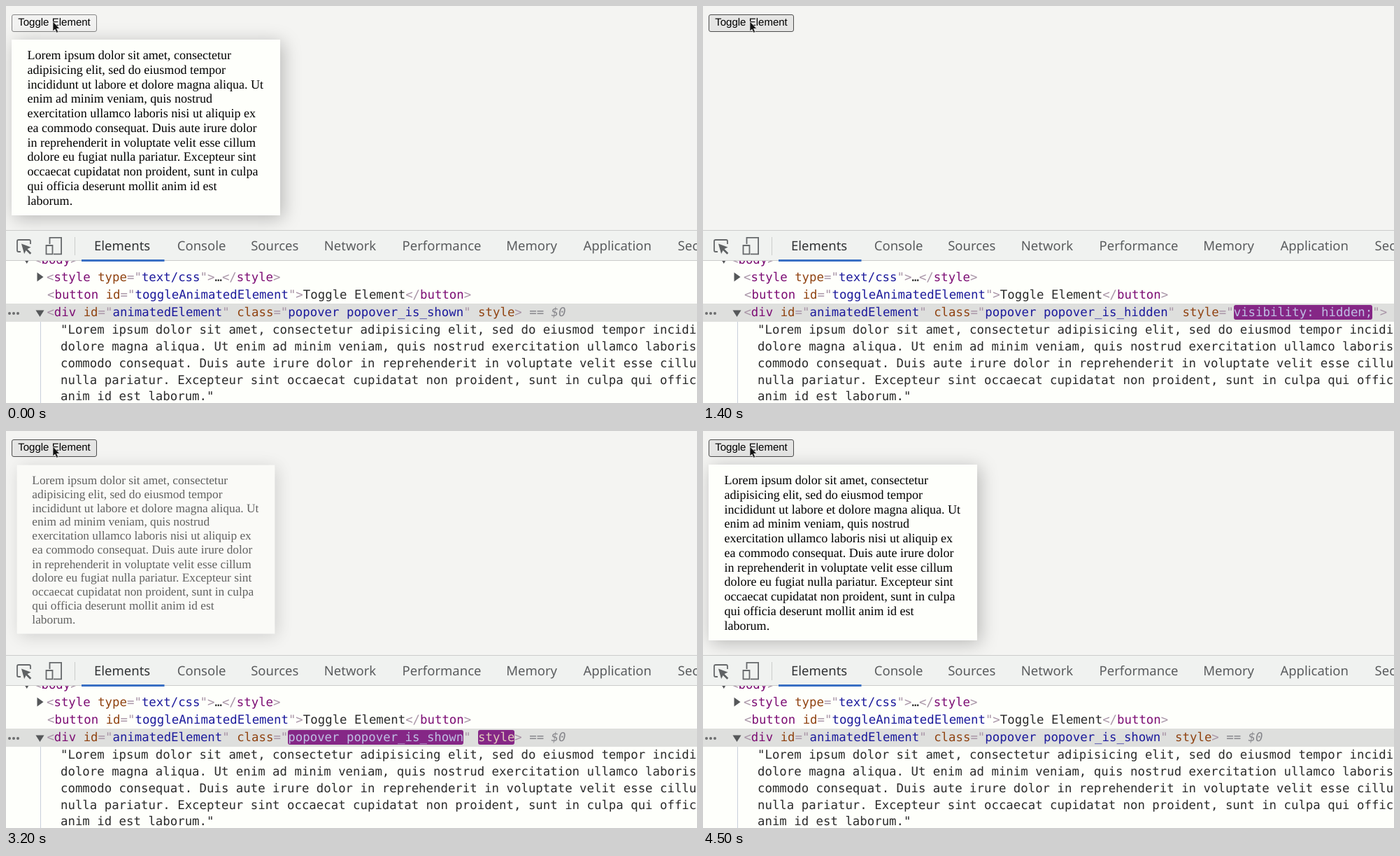
Animation, 988 px wide and 567 px high, one loop 4700 ms. Source, as an HTML page:

```html
<!DOCTYPE html>
<html lang="en">
<head>
<meta charset="utf-8">
<title>Toggle Element</title>
<style>
@property --p { syntax: "<number>"; inherits: false; initial-value: 0; }

html, body { margin: 0; width: 100%; height: 100%; overflow: hidden; }
body { background: #f4f4f2; text-rendering: geometricPrecision; }
.stage { position: relative; width: 988px; height: 567px; overflow: hidden; background: #f4f4f2; }
.stage > *, .tab { position: absolute; white-space: pre; }

.button {
  left: 8px; top: 12px; width: 122px; height: 25px; box-sizing: border-box;
  border: 1px solid #868686; border-radius: 3px; background: #f2f2f1; color: #000;
  font: 15.04px/22px "Liberation Sans", Arial, sans-serif; text-align: center;
  animation: press 4700ms step-end infinite;
}
@keyframes press {
  0%, 61.7% { background: #f2f2f1; border-color: #868686; }
  4.25%, 65.95% { background: #e5e5e4; border-color: #4d4d4d; }
}

.popover {
  left: 8px; top: 48px; width: 384px; height: 251px; box-sizing: border-box;
  padding: 12px 22.56px; background: #fefffb; color: #000;
  box-shadow: 4px 4px 24px rgba(0, 0, 0, .25);
  font: 18.05px/20.75px "Liberation Serif", "Times New Roman", serif;
  opacity: calc(1 - var(--p));
  transform: translateY(calc(var(--p) * -11px)) scale(calc(1 - var(--p) * .1));
  animation: fade 4700ms step-end infinite;
}
@keyframes fade {
  0% { --p: 0; }
  19.14% { --p: .04; }
  21.27% { --p: .48; }
  23.4% { --p: .85; }
  25.53% { --p: 1; }
  65.95% { --p: .9; }
  68.08% { --p: .4; }
  70.21% { --p: .08; }
  72.33%, 100% { --p: 0; }
}

.panel { left: 0; top: 364px; width: 988px; height: 203px; background: #fefffb; }
.selected { left: 0; top: 425px; width: 988px; height: 26px; background: #dedfdd; }
.guide { left: 48.5px; top: 451px; width: 1px; height: 116px; background: #c8cfdb; }

.code { color: #2b2b2b; font: 17.37px/25.4px "DejaVu Sans Mono", monospace; }
.code i { font-style: normal; color: #a894a6; }
.code b { font-weight: normal; color: #7d0d74; }
.code u { text-decoration: none; color: #904311; }
.code s { text-decoration: none; color: #1c1a9c; }
.code em { color: #85858a; font-style: normal; }
.code em span { font-style: italic; }
.prose { left: 78px; top: 452.4px; line-height: 23.75px; }

.code .flash {
  --ink: #1c1a9c; padding-top: 1px; border-radius: 3px;
  animation: flash 4700ms cubic-bezier(0, 0, .2, 1) var(--start) infinite;
}
.code u.flash { --ink: #904311; }
@keyframes flash {
  0% { background: #7a007a; color: #fff; }
  23.83% { background: rgb(162, 140, 165); color: var(--ink); }
  29.78%, 100% { background: rgba(162, 140, 165, 0); color: var(--ink); }
}

.state { left: 58.4px; top: 426.4px; animation: 4700ms step-end infinite; }
.shown { animation-name: shown; --start: 3100ms; }
.hiding { animation-name: hiding; --start: 1000ms; }
.hidden { animation-name: hidden; --start: 1300ms; }
@keyframes shown {
  0%, 65.95%, 100% { visibility: visible; }
  21.27% { visibility: hidden; }
}
@keyframes hiding {
  0%, 27.65%, 100% { visibility: hidden; }
  21.27% { visibility: visible; }
}
@keyframes hidden {
  0%, 65.95%, 100% { visibility: hidden; }
  27.65% { visibility: visible; }
}

.toolbar {
  left: 0; top: 320px; width: 988px; height: 44px; box-sizing: border-box;
  background: #f0f2f0; border: solid #cbcccb; border-width: 1px 0;
}
.tab { top: 9px; color: #5a5c5e; font: 18.5px/26px "Noto Sans", "Open Sans", sans-serif; }
.tab.active { color: #303234; }
svg { left: 0; top: 0; }
</style>
</head>
<body>
<div class="stage">
  <div class="button">Toggle Element</div>
  <div class="popover">Lorem ipsum dolor sit amet, consectetur
adipisicing elit, sed do eiusmod tempor
incididunt ut labore et dolore magna aliqua. Ut
enim ad minim veniam, quis nostrud
exercitation ullamco laboris nisi ut aliquip ex
ea commodo consequat. Duis aute irure dolor
in reprehenderit in voluptate velit esse cillum
dolore eu fugiat nulla pariatur. Excepteur sint
occaecat cupidatat non proident, sunt in culpa
qui officia deserunt mollit anim id est
laborum.</div>

  <div class="panel"></div>
  <div class="selected"></div>
  <div class="guide"></div>

  <div class="code" style="left:40px;top:350.6px"><i>&lt;</i><b>body</b><i>&gt;</i></div>
  <div class="code" style="left:58px;top:375.6px"><i>&lt;</i><b>style</b> <u>type</u><i>="</i><s>text/css</s><i>"&gt;</i>…<i>&lt;/</i><b>style</b><i>&gt;</i></div>
  <div class="code" style="left:59px;top:401px"><i>&lt;</i><b>button</b> <u>id</u><i>="</i><s>toggleAnimatedElement</s><i>"&gt;</i>Toggle Element<i>&lt;/</i><b>button</b><i>&gt;</i></div>

  <div class="code state shown"><i>&lt;</i><b>div</b> <u>id</u><i>="</i><s>animatedElement</s><i>"</i> <u>class</u><i>="</i><s class="flash">popover popover_is_shown</s><i>"</i> <u class="flash">style</u><i>&gt;</i><em> == <span>$0</span></em></div>
  <div class="code state hiding"><i>&lt;</i><b>div</b> <u>id</u><i>="</i><s>animatedElement</s><i>"</i> <u>class</u><i>="</i><s class="flash">popover popover_is_hidden</s><i>"</i> <u>style</u><i>&gt;</i><em> == <span>$0</span></em></div>
  <div class="code state hidden"><i>&lt;</i><b>div</b> <u>id</u><i>="</i><s>animatedElement</s><i>"</i> <u>class</u><i>="</i><s>popover popover_is_hidden</s><i>"</i> <u>style</u><i>="</i><s class="flash">visibility: hidden;</s><i>"&gt;</i><em> == <span>$0</span></em></div>

  <div class="code prose">"Lorem ipsum dolor sit amet, consectetur adipisicing elit, sed do eiusmod tempor incididunt ut
dolore magna aliqua. Ut enim ad minim veniam, quis nostrud exercitation ullamco laboris nisi
commodo consequat. Duis aute irure dolor in reprehenderit in voluptate velit esse cillum dolore
nulla pariatur. Excepteur sint occaecat cupidatat non proident, sunt in culpa qui officia
anim id est laborum."</div>

  <svg width="988" height="567" viewBox="0 0 988 567">
    <g fill="#555759">
      <path d="M24 358.5h11.5l-5.75 9.5z"/>
      <path d="M44.5 380.5v13l9-6.5z"/>
      <path d="M42.5 434.5h12l-6 9.5z"/>
    </g>
    <g fill="#6c6d6e">
      <circle cx="5" cy="439" r="2"/><circle cx="11" cy="439" r="2"/><circle cx="17" cy="439" r="2"/>
    </g>
  </svg>

  <div class="toolbar">
    <span class="tab active" style="left:126px">Elements</span>
    <span class="tab" style="left:244.8px">Console</span>
    <span class="tab" style="left:350.2px">Sources</span>
    <span class="tab" style="left:454.8px">Network</span>
    <span class="tab" style="left:566.6px">Performance</span>
    <span class="tab" style="left:715.2px">Memory</span>
    <span class="tab" style="left:825.4px">Application</span>
    <span class="tab" style="left:960.6px">Security</span>
  </div>

  <svg width="988" height="567" viewBox="0 0 988 567">
    <path d="M98.5 330v26" stroke="#cccdcc"/>
    <path d="M108 362h118.5v3H108z" fill="#3a70c4"/>
    <g fill="none" stroke="#66696b" stroke-width="1.8">
      <path d="M21 351h-3q-2 0-2-2v-13q0-2 2-2h15q2 0 2 2v4"/>
      <path d="M62.5 340v-9.2h16.6v23.6H68"/>
      <path d="M57.5 342h9v12.4h-9z"/>
    </g>
    <path d="M22 339.5l13.5 5-5 2.6 5.8 5.7-1.9 1.9-5.8-5.8-2.5 5z" fill="#5f6264"/>
    <path d="M67 22v14l3.1-2.8 2.2 5 2.4-1-2.2-4.9h4.2z" fill="#111" stroke="#eee" stroke-width=".7"/>
  </svg>
</div>
</body>
</html>
```
